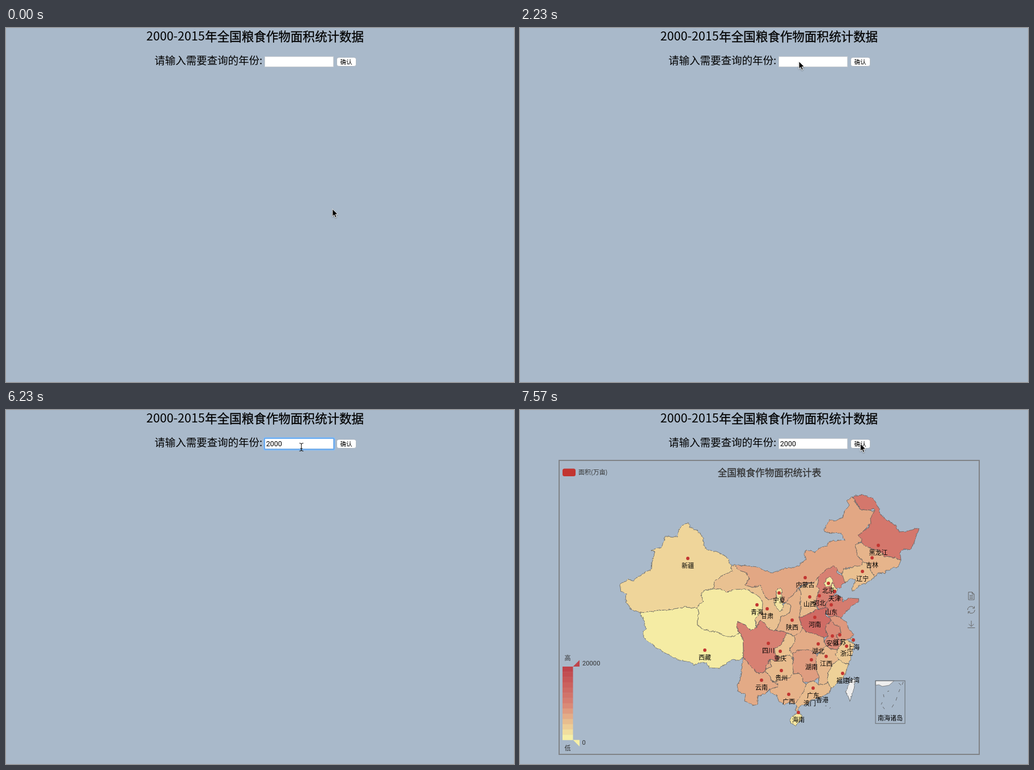
An HTML page for the animation above (8 s loop, 896 px wide and 625 px high).

```html
<!DOCTYPE html>
<html lang="zh-CN">
<head>
<meta charset="utf-8">
<title>粮食作物面积</title>
<style>
  html, body { margin: 0; height: 100%; overflow: hidden; background: #a9b9ca; }
  svg { display: block; width: 100%; height: 100%; }
  text { font-family: "Noto Sans CJK SC", "Noto Sans CJK", sans-serif; font-size: 11px; }
  .heading { font-size: 21.55px; }
  .semi { stroke: currentColor; stroke-width: .3px; }
  .field { font: 12.5px Roboto, sans-serif; }
  .map path { stroke: #555; stroke-width: .7; stroke-linejoin: round; }
  .icons { fill: none; stroke: #666; stroke-width: 1; }
</style>
</head>
<body>
<svg viewBox="0 0 896 625">
  <defs>
    <filter id="rough" filterUnits="userSpaceOnUse" x="160" y="140" width="560" height="430" color-interpolation-filters="sRGB">
      <feTurbulence type="fractalNoise" baseFrequency=".18" numOctaves="2" seed="4"/>
      <feDisplacementMap in="SourceGraphic" scale="4.5" xChannelSelector="R" yChannelSelector="G"/>
    </filter>
    <filter id="shadow" x="-50%" y="-50%" width="200%" height="200%">
      <feDropShadow dx="0" dy="1" stdDeviation=".8" flood-opacity=".4"/>
    </filter>
    <linearGradient id="pressed" x2="0" y2="1">
      <stop stop-color="#6bb0f8"/><stop offset="1" stop-color="#1a74ee"/>
    </linearGradient>
  </defs>

  <text class="heading" x="247.5" y="22.3">2000-2015</text>
  <text class="heading semi" x="351" y="23.3">年全国粮食作物面积统计数据</text>
  <text x="262" y="64" style="font-size:18.5px">请输入需要查询的年份:</text>

  <rect x="456.5" y="50.5" width="121" height="18" fill="#fff" stroke="#c9cdd2"/>
  <g id="focus" fill="none">
    <rect x="455.5" y="49.5" width="123.5" height="20.5" rx="1.5" stroke="#8abdf3" stroke-width="3.2"/>
    <rect x="456" y="50" width="122.5" height="19.5" rx="1" stroke="#62a6ee" stroke-width="1.6"/>
  </g>
  <text id="typed" class="field" x="458.8" y="64"></text>
  <rect id="caret" y="53" width="1" height="14"/>

  <rect id="button" x="583.5" y="52" width="34" height="15.5" rx="3.5" stroke="#a3abb5" stroke-width=".7"/>
  <text id="confirm" x="589.5" y="64" style="font-size:10.6px">确认</text>

  <g id="chart">
    <rect x="69" y="89" width="741" height="519" fill="none" stroke="#808387" stroke-width="2"/>
    <rect x="75" y="103.5" width="23" height="13.5" rx="3.5" fill="#c23531"/>
    <text x="103" y="114" fill="#333">面积(万亩)</text>
    <text class="semi" x="440" y="117.3" text-anchor="middle" fill="#333" color="#333" style="font-size:16.6px">全国粮食作物面积统计表</text>

    <g class="map" filter="url(#rough)">
      <path data-area="2400" d="M297 200L300 207 313 213 324 226 323 240 331 247 347 250 363 258 372 274 374 285 357 292 343 302 341 316 325 318 319 326 324 338 316 343 313 350 290 348 262 353 240 354 222 358 212 357 196 352 186 336 187 324 178 320 176 308 191 299 200 301 217 289 232 281 233 269 238 250 231 247 250 242 256 223 278 224 280 211 290 201Z"/>
      <path data-area="300" d="M212 357L222 358 240 354 262 353 290 348 313 350 316 358 313 368 313 380 325 388 348 392 365 400 377 400 387 393 393 402 394 420 394 437 386 442 375 440 362 449 350 456 334 455 329 446 316 446 308 451 300 445 282 442 265 434 254 428 240 419 228 410 218 402 218 391 222 386 219 374 216 366Z"/>
      <path data-area="4196" d="M372 274L379 274 386 283 399 287 405 298 397 309 410 313 424 309 427 318 433 331 438 335 451 332 448 342 455 352 462 354 463 345 469 340 478 345 476 357 467 363 460 365 459 372 454 384 448 390 440 388 432 377 424 372 418 383 414 369 421 362 427 354 428 340 423 331 412 323 396 316 380 317 365 322 352 316 341 316 343 302 357 292 374 285Z"/>
      <path data-area="495" d="M325 318L341 316 352 316 365 322 380 317 396 316 412 323 423 331 428 340 427 354 421 362 414 369 417 384 407 389 396 379 383 373 382 386 387 393 377 400 365 400 348 392 325 388 313 380 313 368 316 358 313 350 316 343 324 338 319 326Z"/>
      <path data-area="6637" d="M379 274L402 275 418 277 432 284 446 287 466 280 483 278 492 274 505 263 501 255 505 247 520 251 527 244 540 240 546 232 573 229 566 218 552 217 540 216 536 212 546 193 556 196 568 190 573 179 581 168 576 160 587 153 591 163 601 176 613 176 625 179 619 191 619 200 605 214 603 232 592 237 595 256 604 267 603 274 587 277 570 280 569 290 556 282 546 282 533 290 519 303 500 308 490 314 485 324 476 330 469 340 462 341 458 330 460 318 453 318 451 332 438 335 433 331 427 318 424 309 410 313 397 309 405 298 399 287 386 283Z"/>
      <path data-area="11778" d="M587 153L592 151 606 150 621 155 627 162 632 171 634 180 640 189 650 196 661 203 669 215 682 214 704 208 700 219 695 234 689 247 677 245 670 251 672 265 661 261 652 259 643 258 635 249 626 247 618 244 609 240 602 234 603 227 597 222 605 214 614 208 619 200 618 191 625 179 624 174 613 177 601 175 592 163Z"/>
      <path data-area="5375" d="M592 237L602 234 609 240 618 244 626 247 635 249 643 258 652 259 661 261 672 265 667 277 658 278 652 283 645 283 644 289 634 287 625 295 618 283 616 272 604 267 595 256 593 246Z"/>
      <path data-area="4287" d="M604 267L616 272 618 283 625 295 612 305 600 309 587 320 586 314 592 300 583 297 573 306 565 297 569 290 570 280 579 280 587 277 595 275 603 273Z"/>
      <path data-area="10378" d="M526 295L540 281 553 276 560 280 559 288 569 292 573 305 565 313 556 316 558 323 549 331 541 338 538 349 527 352 521 342 524 328 529 317 523 311 526 304Z"/>
      <path data-area="462" d="M537 306L540 299 546 295 552 299 550 306 546 312 539 312Z"/>
      <path data-area="517" d="M550 308L554 305 555 313 559 317 555 323 550 320Z"/>
      <path data-area="4780" d="M493 315L500 309 519 303 526 296 526 304 523 311 529 317 524 328 521 342 525 352 515 357 503 363 492 366 495 352 494 338 496 324Z"/>
      <path data-area="5731" d="M492 313L496 324 494 338 495 352 492 366 494 372 498 384 495 392 484 399 470 393 450 389 454 384 459 372 460 365 467 363 476 357 478 345 469 340 476 330 485 324Z"/>
      <path data-area="1209" d="M453 318L458 313 462 317 461 330 462 340 465 347 459 356 455 352 448 342 451 332Z"/>
      <path data-area="11045" d="M541 338L549 331 558 326 569 331 570 338 580 332 597 333 598 338 585 346 577 355 572 359 566 367 557 363 549 366 540 360 543 352 538 349Z"/>
      <path data-area="13544" d="M525 352L538 349 545 352 538 358 540 364 548 369 545 377 540 380 539 390 544 399 536 402 527 398 515 394 504 392 498 384 494 372 492 366 503 363 515 357Z"/>
      <path data-area="7956" d="M545 366L557 363 566 367 575 375 580 387 589 397 583 402 575 406 566 406 560 403 558 396 566 394 564 383 553 378Z"/>
      <path data-area="9275" d="M548 369L553 378 564 383 566 394 558 396 560 403 566 406 567 414 560 423 549 422 541 416 536 408 544 399 539 390 540 380 545 377Z"/>
      <path data-area="3450" d="M566 406L575 406 583 410 590 414 587 422 586 432 579 449 570 446 563 440 556 433 560 423 567 414Z"/>
      <path data-area="388" d="M583 403L588 402 591 408 585 410Z"/>
      <path data-area="2726" d="M563 440L570 446 579 449 575 462 570 472 561 480 552 490 549 491 544 483 541 473 545 461 551 449Z"/>
      <path data-area="4973" d="M541 416L549 422 560 423 556 433 563 440 551 449 545 461 541 473 543 481 534 486 526 484 528 473 524 462 522 446 524 434 530 426Z"/>
      <path data-area="6267" d="M498 384L504 392 515 394 527 398 536 402 536 409 541 416 530 426 521 430 514 425 502 424 490 424 481 431 475 424 481 414 486 409 484 399 495 392Z"/>
      <path data-area="7539" d="M481 431L490 424 502 424 514 425 521 430 524 434 522 446 524 462 528 473 518 478 508 481 499 479 492 465 483 466 480 450 483 440Z"/>
      <path data-area="10281" d="M383 373L396 379 407 389 417 384 424 372 432 377 440 388 450 389 470 393 473 400 466 404 459 416 449 421 450 431 458 438 452 444 440 440 436 450 431 462 421 466 412 458 403 449 401 444 394 437 394 420 393 402 387 393 382 386Z"/>
      <path data-area="4161" d="M470 394L484 399 486 409 481 414 475 424 481 431 482 441 475 432 468 434 458 438 450 431 449 421 459 416 466 404Z"/>
      <path data-area="4724" d="M440 440L452 444 458 438 468 434 475 432 482 441 480 450 483 466 476 473 465 474 455 479 445 480 441 470 434 463 432 458 443 453Z"/>
      <path data-area="6360" d="M394 437L401 444 403 449 412 458 421 466 431 462 436 450 440 441 443 453 432 458 434 463 441 470 445 480 455 483 454 490 440 493 432 501 420 505 418 520 410 522 402 516 396 514 398 502 385 497 383 485 388 478 390 463 391 450Z"/>
      <path data-area="5481" d="M445 480L455 479 465 474 476 473 483 466 492 465 497 470 499 479 505 484 502 494 497 503 489 513 486 519 474 517 465 520 456 512 452 504 441 499 441 492 454 490 455 483Z"/>
      <path data-area="4648" d="M505 484L508 481 518 478 526 484 534 486 543 481 549 491 546 499 535 505 524 509 516 511 507 518 497 521 492 524 491 532 486 530 488 522 486 519 489 513 497 503 502 494Z"/>
      <path data-area="801" d="M480 541L488 536 496 537 498 543 492 551 486 557 478 553 476 547Z"/>
      <path fill="#eee" d="M589 474L592 477 589 492 582 514 579 506 575 497 580 484 585 476Z"/>
      <path fill="#eee" d="M538 523l3 -1M546 527l2 -2M522 509l3 -3"/>
    </g>

    <path d="M627 478H660L651 486 639 488 633 485 627 486Z" fill="#eee" stroke="#666" stroke-width=".7"/>
    <rect x="627" y="478" width="52" height="75.5" fill="none" stroke="#70757b" stroke-width="1.2"/>
    <path d="M668 482l4 4M676 480l-2 5M670 493l-2 5M665 507l-2 6M659 520l-3 5M643 528l-3 -4M637 520l2 -4M642 507l-1 -5M648 497l3 -1" stroke="#555" stroke-width=".8"/>
    <g id="dots" fill="#c23531"></g>
    <g id="labels" text-anchor="middle"></g>

    <g id="scale"></g>
    <path d="M93.5 453H105V441.5Z" fill="#bf444c"/>
    <path d="M93.5 582.5H105V594Z" fill="#f6efa6"/>
    <g fill="#333">
      <text x="84" y="442" text-anchor="middle">高</text>
      <text x="84" y="601" text-anchor="middle">低</text>
      <text x="110" y="451" style="font:11.2px Roboto,sans-serif">20000</text>
      <text x="109.5" y="591" style="font:11.2px Roboto,sans-serif">0</text>
    </g>
    <g class="icons">
      <path d="M791 321.5H797.5L801 325V335H791ZM797.5 321.5V325H801M793 327.5H799M793 330H799M793 332.5H799"/>
      <path d="M789.5 353A6.3 6.3 0 0 1 801 349.5M802.3 353A6.3 6.3 0 0 1 791 356.5M801.5 346.5V350H798M790.5 359.5V356H794"/>
      <path d="M796 372V382M791.5 378L796 382.2 800.5 378M789.5 384.5H802.5"/>
    </g>
  </g>

  <path id="arrow" d="M.8 1V14.2L3.8 11.4 5.8 16.2 8.1 15.2 6.1 10.5H10.3Z" stroke="#fff" stroke-width=".9" filter="url(#shadow)"/>
  <path id="beam" d="M-3.5 -7Q0 -7 0 -4.5V4.5Q0 7 -3.5 7M3.5 -7Q0 -7 0 -4.5M0 4.5Q0 7 3.5 7M-2 2.5H2" fill="none" stroke="#111" stroke-width="1.1"/>
</svg>
<script>
const LOOP = 8000;
const MAX_AREA = 20000;
const SVG = "http://www.w3.org/2000/svg";
const $ = id => document.getElementById(id);

function add(parent, tag, attrs, content = "") {
  const node = document.createElementNS(SVG, tag);
  for (const key in attrs) node.setAttribute(key, attrs[key]);
  node.textContent = content;
  $(parent).append(node);
}

// Capitals at their map position; the label sits below the dot.
const places = `新疆 296 262,西藏 326 424,青海 418 344,甘肃 436 351,宁夏 457 323,内蒙古 503 296,
黑龙江 632 239,吉林 621 261,辽宁 604 285,北京 544 306,天津 555 320,河北 528 328,山西 511 330,
山东 549 344,河南 520 366,陕西 480 371,四川 438 412,重庆 459 426,湖北 526 413,安徽 551 399,
江苏 564 397,上海 588 406,浙江 576 417,江西 540 435,湖南 514 441,贵州 461 460,云南 426 477,
福建 569 465,广西 474 502,广东 517 491,海南 491 534`;
const unmarked = "台湾 588 464,香港 533 499,澳门 511 505,南海诸岛 653 530.5";

function place(list, marked) {
  for (const row of list.split(",")) {
    const [name, x, y] = row.trim().split(" ");
    if (marked) add("dots", "circle", { cx: x, cy: y, r: 2.9 });
    add("labels", "text", { x, y: +y + 17 }, name);
  }
}
place(places, true);
place(unmarked, false);

const ramp = [[246, 239, 166], [216, 130, 115], [191, 68, 76]];
function shade(area) {
  const p = area / MAX_AREA * 2, k = Math.min(1, Math.floor(p));
  return `rgb(${ramp[k].map((c, i) => Math.round(c + (ramp[k + 1][i] - c) * (p - k)))})`;
}
for (const region of document.querySelectorAll("[data-area]")) {
  region.setAttribute("fill", shade(region.dataset.area));
}

const BANDS = 14;
for (let i = 0; i < BANDS; i++) {
  const h = 129.5 / BANDS;
  const fill = shade(MAX_AREA * (1 - i / (BANDS - 1)));
  add("scale", "rect", { x: 75, y: 453 + i * h, width: 18.5, height: h + .3, fill });
}

// Pointer travel sampled in six steps, slowing towards the end.
function glide(start, end, [x0, y0], [x1, y1]) {
  return Array.from({ length: 6 }, (_, i) => {
    const p = 1 - (1 - (i + 1) / 6) ** 1.3;
    return [start + (end - start) * i / 5, "arrow", x0 + (x1 - x0) * p, y0 + (y1 - y0) * p];
  });
}
const pointer = [
  [0, "arrow", 575, 318.5],
  ...glide(450, 1180, [575, 318.5], [491.7, 170.5]),
  ...glide(1480, 2230, [491.7, 170.5], [491.2, 58]),
  [3400, "beam", 492.5, 60],
  [6230, "beam", 521, 65.5],
  [6380, "beam", 549, 66],
  [6530, "beam", 572, 66],
  [6680, "arrow", 591, 58.5],
  [6820, "arrow", 599.5, 58.5],
];
const typing = [[0, ""], [4600, "2"], [4890, "20"], [5340, "200"], [5640, "2000"]];
const blink = [[0, false], [3400, true], [4000, false], [4450, true], [6230, false], [6680, true], [6970, false]];

const at = (steps, t) => steps.findLast(step => step[0] <= t + .5);
const show = (id, on) => $(id).setAttribute("visibility", on ? "visible" : "hidden");

function draw() {
  const t = performance.now() % LOOP;
  const [, shape, x, y] = at(pointer, t);
  for (const id of ["arrow", "beam"]) show(id, id === shape);
  $(shape).setAttribute("transform", `translate(${x} ${y})`);

  const text = at(typing, t)[1];
  $("typed").textContent = text;
  $("caret").setAttribute("x", 459 + text.length * 7);
  show("caret", at(blink, t)[1]);
  show("focus", t >= 3400 && t < 6970);

  const down = t >= 6970 && t < 7270;
  $("button").setAttribute("fill", down ? "url(#pressed)" : "#fff");
  $("confirm").setAttribute("fill", down ? "#fff" : "#000");
  show("chart", t >= 7570);
  requestAnimationFrame(draw);
}
draw();
</script>
</body>
</html>
```
